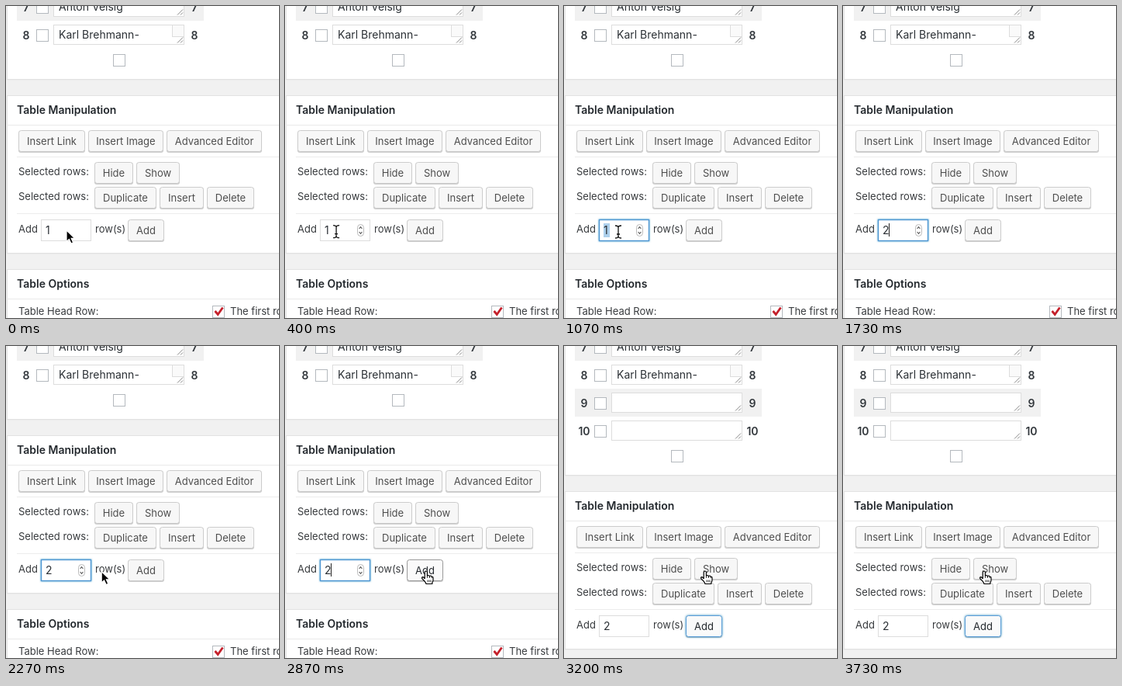
An HTML page for the animation above (3.79 s loop, 352 px wide and 402 px high).

```html
<!DOCTYPE html>
<html lang="en">
<head>
<meta charset="utf-8">
<title>Adding table rows</title>
<style>
html, body { margin: 0; width: 100%; height: 100%; overflow: hidden; background: #f1f1f1; }
svg { display: block; width: 352px; height: 402px; font: 13px Inter, Roboto, sans-serif; }
text { fill: #383b3e; white-space: pre; }
.head { font-size: 14px; font-weight: 600; fill: #23282d; }
.num { font-size: 14px; font-weight: 600; fill: #32373c; text-anchor: middle; }
.field { font-size: 14px; fill: #2b3035; }
.btn text { fill: #4e4e4e; text-anchor: middle; }
.btn rect { fill: #f7f7f7; stroke: #ccc; }
.btn .lip { fill: #ccc; stroke: none; }
.btn.hover text, .btn.focus text { fill: #23282d; }
.btn.hover .face { fill: #fafafa; stroke: #999; }
.btn.press .face { fill: #eee; stroke: #999; }
.btn.focus .face { fill: #fafafa; stroke: #5b9dd9; filter: drop-shadow(0 0 1.5px rgba(0,115,170,.8)); }
.input { fill: #fff; stroke: #ddd; }
.input.focus { stroke: #4f97d3; stroke-width: 1.4; filter: drop-shadow(0 0 1px rgba(30,140,190,.8)); }
</style>
</head>
<body>
<svg id="stage" viewBox="0 0 352 402"></svg>
<script>
const LOOP = 3790, ROW = 36, ADDED = 2 * ROW;
const SELECT = 800, TYPE = 1670, REAPPEAR = 1870, CLICK = 2930, GROW = 3190;
const presses = [[600, 740], [800, 930], [CLICK, GROW]];
// time, x, y of the pointer's hot spot
const track = [
  [0, 78, 289], [530, 64, 291], [930, 64, 291], [1070, 70, 291],
  [REAPPEAR, 70, 291], [2700, 182, 290], [LOOP, 182, 290]
];

const stage = document.getElementById("stage");

function el(parent, tag, attrs = {}, content) {
  const node = document.createElementNS("http://www.w3.org/2000/svg", tag);
  for (const key in attrs) node.setAttribute(key, attrs[key]);
  if (content !== undefined) node.textContent = content;
  parent.append(node);
  return node;
}
const group = parent => el(parent, "g");
const label = (parent, x, y, content, cls = "") => el(parent, "text", { x, y, class: cls }, content);
const path = (parent, d, stroke, width = 1, fill = "none") =>
  el(parent, "path", { d, stroke, "stroke-width": width, fill });
const box = (parent, x, y, w, h, attrs = {}) =>
  el(parent, "rect", { x: x + .5, y: y + .5, width: w - 1, height: h - 1, fill: "#fff", stroke: "#ddd", ...attrs });
const line = (parent, x, y, color) => path(parent, `M${x} ${y + .5}H352`, color);

function panel(parent, y, h, title) {
  box(parent, 1, y, 420, h + 1, { stroke: "#ebebeb" });
  box(parent, 1, y, 420, h, { stroke: "#e2e2e2" });
  if (!title) return;
  label(parent, 14, y + 24, title, "head");
  line(parent, 1, y + 38, "#eaeaea");
}

function button(parent, x, y, w, caption) {
  const g = el(parent, "g", { class: "btn" });
  el(g, "rect", { x, y: y + 1, width: w, height: 28, rx: 3, class: "lip" });
  box(g, x, y, w, 28, { rx: 3, class: "face" });
  label(g, x + w / 2, y + 19, caption);
  return g;
}

const checkbox = (parent, x, y) => box(parent, x, y, 16, 16, { stroke: "#b4b9be" });

function tableRow(parent, n, content) {
  const y = 20 + (n - 8) * ROW;
  if (n % 2) el(parent, "rect", { x: 14, y: y - 1, width: 241, height: ROW, fill: "#f1f1f1" });
  label(parent, 26, y + 23, n, "num");
  label(parent, 243, y + 23, n, "num");
  checkbox(parent, 39, y + 10);
  box(parent, 61, y + 4, 169, 26);
  if (n === 8) box(parent, 214, y + 4, 16, 16, { fill: "#fafafa" });
  path(parent, `M221 ${y + 27.5}l7 -7M225 ${y + 27.5}l3 -3`, "#777", .9);
  label(parent, 68, y + 22, content, "field");
}

// Table panel
const topPanel = group(stage);
panel(topPanel, -60, 155);
const tallPanel = group(stage);
panel(tallPanel, -60, 155 + ADDED);
tableRow(stage, 7, "Anton Velsig");
tableRow(stage, 8, "Karl Brehmann-");
const newRows = group(stage);
tableRow(newRows, 9, "");
tableRow(newRows, 10, "");

// Everything that slides down when rows are added
const lower = group(stage);
checkbox(lower, 138, 62);
panel(lower, 115, 204, "Table Manipulation");
button(lower, 16, 160, 86, "Insert Link");
button(lower, 106, 160, 97, "Insert Image");
button(lower, 207, 160, 123, "Advanced Editor");
line(lower, 14, 194, "#ececec");
label(lower, 16, 218, "Selected rows:");
button(lower, 114, 201, 50, "Hide");
button(lower, 168, 201, 56, "Show");
label(lower, 16, 250, "Selected rows:");
button(lower, 114, 233, 80, "Duplicate");
button(lower, 198, 233, 57, "Insert");
button(lower, 259, 233, 61, "Delete");
line(lower, 14, 267, "#ececec");
label(lower, 16, 292, "Add");
label(lower, 115, 292, "row(s)");
const addButton = button(lower, 157, 275, 47, "Add");

const input = box(lower, 45, 275, 65, 28, { class: "input" });
const selection = el(lower, "rect", { x: 51, y: 280, width: 8, height: 18, fill: "#add0ec" });
const value = label(lower, 51, 294, "1", "field");
const caret = path(lower, "M59.5 280V297", "#222");
const spinner = group(lower);
box(spinner, 93, 281, 9, 16, { rx: 4, stroke: "#bbb" });
path(spinner, "M95.6 287l1.9 -2.4l1.9 2.4M95.6 291l1.9 2.4l1.9 -2.4", "#555", 1.1);

panel(lower, 339, 120, "Table Options");
label(lower, 16, 398, "Table Head Row:");
checkbox(lower, 266, 386);
path(lower, "M269.5 393L273.2 397.5L279.5 388.5", "#c4202b", 2.8);
label(lower, 289, 398, "The first row");

// Pointer
const pointer = group(stage);
const ring = el(pointer, "circle", { r: 15, fill: "#fff", "fill-opacity": .4, stroke: "#000", "stroke-width": 3 });
const arrow = group(pointer);
path(arrow, "M0 0V14.5L3.4 11.4L6 17L8.6 15.8L6.2 10.4H10.6Z", "#fff", 1.2, "#000");
const beam = group(pointer);
const beamShape = "M-4 -8Q0 -8 0 -5.5Q0 -8 4 -8M0 -6V6M-4 8Q0 8 0 5.5Q0 8 4 8M-2 3H2";
path(beam, beamShape, "#fff", 2.8);
path(beam, beamShape, "#111", 1.3);
const hand = group(pointer);
path(hand, "M-1.8 10V1.6a1.6 1.6 0 0 1 3.2 0V6.5q.3 -1 1.5 -1t1.5 1.2q.4 -.8 1.5 -.7t1.3 1.3q1.8 -.4 1.8 1.5v2.6q0 1.8 -1.2 3.2V16.5H0q-.5 -2 -2.5 -4L-5.3 9.6q-.6 -1.8 1 -2q1 0 2.5 2.2z",
  "#000", 1.2, "#fff");
path(hand, "M1.4 6V9M4.4 6.5V9M7.2 7.2V9.2M2 11.5V14M4 11.5V14M6 11.5V14", "#000", .8);

const show = (node, on) => { node.style.display = on ? "" : "none"; };
const ease = p => p * p * (3 - 2 * p);

function place(t) {
  const i = track.findIndex(step => step[0] > t);
  const [t0, x0, y0] = track[i - 1], [t1, x1, y1] = track[i];
  const p = ease((t - t0) / (t1 - t0));
  return [x0 + (x1 - x0) * p, y0 + (y1 - y0) * p];
}

function draw(t) {
  const grown = t >= GROW, focused = t >= 600 && t < CLICK;
  const [x, y] = place(t);
  const overInput = t >= 70 && x < 110, overButton = x >= 157;
  const pressed = t >= CLICK && !grown;

  show(topPanel, !grown);
  show(tallPanel, grown);
  show(newRows, grown);
  lower.setAttribute("transform", `translate(0 ${grown ? ADDED : 0})`);

  input.classList.toggle("focus", focused);
  addButton.classList.toggle("hover", overButton && t < CLICK);
  addButton.classList.toggle("press", pressed);
  addButton.classList.toggle("focus", grown);
  addButton.setAttribute("transform", `translate(0 ${pressed ? 1 : 0})`);
  value.textContent = t < TYPE ? "1" : "2";
  const selected = t >= SELECT && t < TYPE;
  show(selection, selected);
  const blinkStart = t < TYPE ? 600 : TYPE;
  show(caret, focused && !selected && (t - blinkStart) % 1000 < 500);
  show(spinner, focused || (overInput && t < TYPE));

  pointer.setAttribute("transform", `translate(${x} ${y})`);
  show(pointer, t < TYPE || t >= REAPPEAR);
  show(ring, presses.some(([from, to]) => t >= from && t < to));
  show(beam, overInput);
  show(hand, overButton);
  show(arrow, !overInput && !overButton);
}

const start = performance.now();
function tick() {
  draw((performance.now() - start) % LOOP);
  requestAnimationFrame(tick);
}
tick();
</script>
</body>
</html>
```
